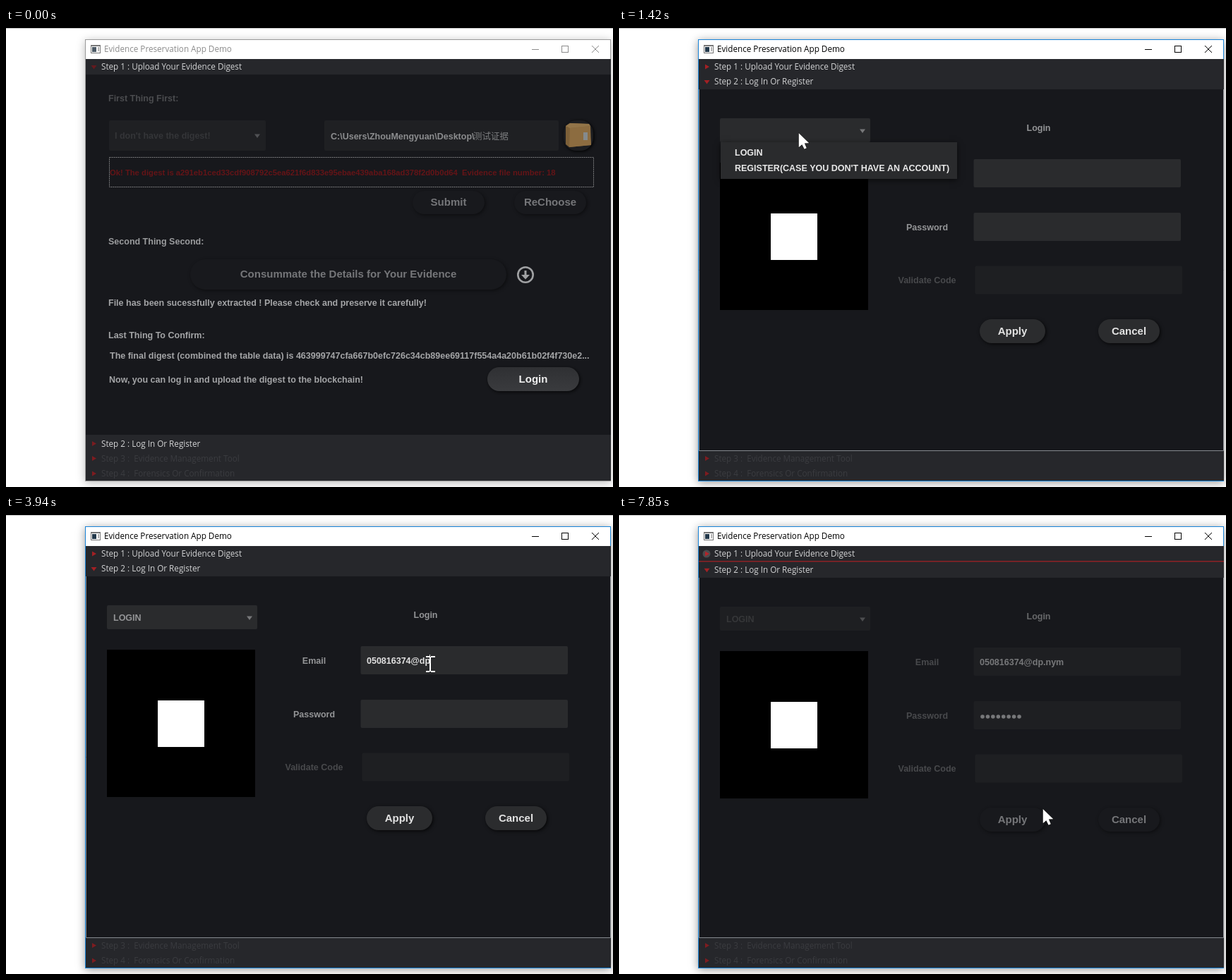
Write an HTML page with a canvas that moves like this. It is 860x651 px and loops after 8 s.

```html
<!DOCTYPE html>
<html lang="en">
<head>
<meta charset="utf-8">
<title>Evidence Preservation App Demo</title>
<style>
html, body { margin: 0; width: 100%; height: 100%; overflow: hidden; background: #fff; }
canvas { display: block; }
</style>
</head>
<body>
<canvas id="stage" width="860" height="651"></canvas>
<script>
const g = document.getElementById('stage').getContext('2d');
const LOOP = 8000;
const BG = '#17181c', BAR = '#26272b', FIELD = '#2a2b2d', LABEL = '#949597', BRIGHT = '#e2e2e2', RED = '#a32024';
const ARIAL = '"Liberation Sans", Arial, "Noto Sans CJK SC", "Noto Sans CJK", sans-serif';
const UI = '"Open Sans", "Noto Sans", sans-serif';
const EMAIL = '050816374@dp.nym';

// When each character appears
const emailKeys = [2520, 2520, 2633, 2746, 2859, 2972, 3085, 3198, 3310,
  3620, 3830, 3940, 4160, 4270, 4370, 4480];
const passKeys = [5040, 5150, 5380, 5480, 5800, 5800, 6000, 6110];

// Pointer stops: time, x, y, text cursor
const pointer = [
  [100, 746, 500], [950, 600, 395], [1065, 370, 228], [1180, 254, 148],
  [1640, 244, 156], [1750, 230, 164], [1860, 219, 169], [1960, 212, 171],
  [2300, 601, 211, 1], [4590, 630, 262, 1], [4700, 624, 283, 1],
  [6320, 604, 345], [6430, 545, 440], [6540, 527, 447], [6650, 552, 431],
  [7320, 558, 430], [7430, 568, 427], [7530, 578, 424], [7640, 588, 420],
  [7740, 596, 417], [7850, 600, 416]
];

const typed = (keys, t) => keys.filter(k => k <= t).length;

function rect(x, y, r, b, color) {
  g.fillStyle = color;
  g.fillRect(x, y, r - x, b - y);
}

function round(x, y, r, b, radius, color) {
  g.fillStyle = color;
  g.beginPath();
  g.roundRect(x, y, r - x, b - y, radius);
  g.fill();
}

function poly(points, color) {
  g.fillStyle = color;
  g.beginPath();
  points.forEach(([x, y]) => g.lineTo(x, y));
  g.closePath();
  g.fill();
}

function line(points, color, width = 1) {
  g.strokeStyle = color;
  g.lineWidth = width;
  g.beginPath();
  points.forEach(([x, y], i) => i ? g.lineTo(x, y) : g.moveTo(x, y));
  g.stroke();
}

function disc(x, y, r, color) {
  g.fillStyle = color;
  g.beginPath();
  g.arc(x, y, r, 0, 7);
  g.fill();
}

// y is the middle of the capitals; baselines sit on whole pixels
function text(s, x, y, color, size = 12.5, align = 'left', weight = 'bold') {
  g.font = `${weight} ${size}px ${ARIAL}`;
  g.textAlign = align;
  g.fillStyle = color;
  g.fillText(s, x, Math.floor(y + size * .36));
}

function uiText(s, x, y, color) {
  g.font = `11.7px ${UI}`;
  g.textAlign = 'left';
  g.fillStyle = color;
  g.fillText(s, x, Math.round(y + 4));
}

function shadow(blur, dx, dy, color, draw) {
  g.save();
  g.shadowBlur = blur;
  g.shadowOffsetX = dx;
  g.shadowOffsetY = dy;
  g.shadowColor = color;
  draw();
  g.restore();
}

function pill(s, x, y, r, b, fill, color, shade = '#000b') {
  shadow(5, 1.5, 1.5, shade, () => round(x, y, r, b, (b - y) / 2, fill));
  text(s, (x + r) / 2, (y + b) / 2, color, 15, 'center');
}

const dimPill = (s, x, y, r, b) => pill(s, x, y, r, b, '#18191d', '#757679', '#0007');

const dropArrow = (x, y, color) => poly([[x - 4, y - 2.5], [x + 4, y - 2.5], [x, y + 3]], color);

function marker(y, open, color = RED) {
  poly(open ? [[120.5, y - 2], [128.5, y - 2], [124.5, y + 3.5]]
            : [[122, y - 3.5], [128, y], [122, y + 3.5]], color);
}

function step(s, y, top, open, color = '#d2d3d4', mark = RED) {
  rect(113, top, 857, top + 22, BAR);
  marker(y, open, mark);
  uiText(s, 135, y, color);
}

function clipped(top, bottom, draw) {
  if (bottom <= top) return;
  g.save();
  g.beginPath();
  g.rect(113, top, 744, bottom - top);
  g.clip();
  draw();
  g.restore();
}

function windowFrame(active) {
  const ink = active ? '#000' : '#8c8c8c';
  rect(0, 0, 860, 651, '#fff');
  rect(0, 0, 860, 1, '#c4c4c4');
  shadow(12, 0, 2, active ? '#0006' : '#0004',
    () => rect(112, 16, 857, 643, active ? '#1883d7' : '#9a9a9a'));
  rect(113, 17, 856, 44, '#fff');
  rect(113, 44, 857, 642, BAR);
  rect(120, 24, 134, 36, '#777');
  rect(121, 26, 133, 35, '#fff');
  rect(122, 27, 128, 34, active ? '#243a4c' : '#4c5a66');
  rect(130, 27, 132, 33, '#b4b4b4');
  uiText('Evidence Preservation App Demo', 139, 30, ink);
  line([[745, 30.5], [755, 30.5]], ink);
  g.strokeStyle = ink;
  g.strokeRect(787.5, 25.5, 9, 9);
  line([[830, 25], [840, 35]], ink);
  line([[840, 25], [830, 35]], ink);
}

function uploadPane() {
  rect(113, 65, 857, 577, BG);
  text('First Thing First:', 145, 100, '#4b4c4f');
  round(146, 131, 368, 174, 2, '#1f2023');
  text("I don't have the digest!", 154, 153, '#343538');
  dropArrow(356, 153, '#505154');
  round(451, 131, 783, 174, 2, '#1f2023');
  text('C:\\Users\\ZhouMengyuan\\Desktop\\', 460, 153.5, '#8c8d8f');
  text('测试证据', 662, 153.5, '#7c7d7f', 12.5, 'left', 'normal');

  shadow(4, 1, 1, '#000', () => round(790, 131, 832, 174, 18, '#1c1d20'));
  poly([[793, 139], [799, 135], [826, 136], [829, 166], [798, 169], [793, 165]], '#7d6038');
  poly([[799, 142], [828, 139], [829, 166], [798, 169]], '#8c6c40');
  poly([[793, 139], [799, 135], [826, 136], [828, 139], [799, 142]], '#927448');
  rect(818, 148, 824, 159, '#858a8d');

  g.setLineDash([2, 1]);
  g.strokeStyle = '#7c7d7f';
  g.lineWidth = 1;
  g.strokeRect(146.5, 183.5, 686, 42);
  g.setLineDash([]);
  text('Ok! The digest is a291eb1ced33cdf908792c5ea621f6d833e95ebae439aba168ad378f2d0b0d64  Evidence file number: 18',
    147, 205, '#641417', 11.25);
  dimPill('Submit', 576, 231, 678, 264);
  dimPill('ReChoose', 720, 231, 822, 264);
  text('Second Thing Second:', 145, 303, '#9b9c9e');
  dimPill('Consummate the Details for Your Evidence', 261, 328, 709, 371);
  g.strokeStyle = '#a0a1a3';
  g.lineWidth = 2.6;
  g.beginPath();
  g.arc(736, 350, 10.7, 0, 7);
  g.stroke();
  rect(734.5, 344, 737.5, 351, '#a0a1a3');
  poly([[730, 350], [742, 350], [736, 356.5]], '#a0a1a3');
  text('File has been sucessfully extracted ! Please check and preserve it carefully!', 145, 390, '#a4a5a7');
  text('Last Thing To Confirm:', 145, 436, '#a4a5a7');
  text('The final digest (combined the table data) is 463999747cfa667b0efc726c34cb89ee69117f554a4a20b61b02f4f730e2...',
    147, 465, '#a4a5a7');
  text('Now, you can log in and upload the digest to the blockchain!', 146, 498.5, '#a4a5a7');
  const glow = g.createLinearGradient(0, 481, 0, 515);
  glow.addColorStop(0, '#2f3033');
  glow.addColorStop(1, '#3a3b3e');
  pill('Login', 682, 481, 812, 515, glow, '#f0f0f0');
}

// Drawn with its header ending at y = 87
function loginPane(t) {
  const off = t >= 6860;
  const field = off ? '#1e1f22' : FIELD;
  const label = off ? '#48494c' : LABEL;
  const value = off ? '#77787a' : BRIGHT;
  round(143, 128, 356, 162, 2, field);
  if (t >= 2180) text('LOGIN', 152, 145.5, off ? '#363739' : LABEL);
  dropArrow(345, 146, off ? '#4d4e50' : '#77787a');
  rect(143, 191, 353, 400, '#000');
  rect(215, 263, 281, 329, '#fff');

  text('Login', 594.5, 142, off ? '#68696b' : LABEL, 12.5, 'center');
  text('Email', 436.5, 207, label, 12.5, 'center');
  text('Password', 436.5, 283, label, 12.5, 'center');
  text('Validate Code', 436.5, 358, '#48494c', 12.5, 'center');
  round(502.5, 186, 796, 226, 2, field);
  round(502.5, 262, 796, 302, 2, field);
  round(504.5, 337.5, 798, 377.5, 2, '#1e1f22');

  const mail = EMAIL.slice(0, typed(emailKeys, t));
  text(mail, 511, 207, value);
  if (t >= 2520 && t < 4590) {
    const end = Math.round(511 + g.measureText(mail).width);
    rect(end - 1, 198, end, 215, BRIGHT);
  }
  const dots = typed(passKeys, t);
  for (let i = 0; i < dots; i++) disc(515 + 7.43 * i, 284, 2.8, off ? '#77787a' : '#d8d8d8');
  if (t >= 4930 && !off) {
    const end = Math.round(511 + 7.45 * dots);
    rect(end, 274, end + 1, 291, BRIGHT);
  }
  const button = off ? dimPill : (...box) => pill(...box, '#2b2c2e', BRIGHT);
  button('Apply', 511, 413, 604, 447);
  button('Cancel', 679, 413, 766, 447);
}

function accordion(t) {
  const opening = t < 640;
  const stepped = Math.floor((t - 100) / 108) / 4;
  const p = Math.min(1, Math.max(0, stepped));
  const ease = p * p * (3 - 2 * p);
  const head = 65 + 512 * (1 - ease);     // top of the second header
  const off = t >= 6860;
  const focused = !opening && t < 1320;
  const shift = focused || off ? 2 : 0;

  if (p < 1) clipped(65, head, uploadPane);
  clipped(head, 599, () => {
    rect(113, head, 857, 599, BG);
    g.translate(0, head - 65 + shift);
    if (p > 0) loginPane(t);
  });
  step('Step 3 :  Evidence Management Tool', 610.5, 599, false, '#3b3c40', '#7e1c20');
  step('Step 4 :  Forensics Or Confirmation', 632, 620, false, '#3b3c40', '#7e1c20');
  if (p > 0) {
    const top = head + 22 + shift;
    line([[113.5, top], [113.5, 599.5], [856.5, 599.5], [856.5, top]], '#85898e');
  }
  step('Step 1 : Upload Your Evidence Digest', 55, 44, p < 1, '#d2d3d4', p < 1 ? '#651a1e' : RED);
  const y2 = head + (off ? 12.7 : p > 0 ? 11 : 12.5);
  rect(113, head, 857, head + 22 + shift, BAR);
  if (focused) disc(124.5, y2 - .5, 5.5, '#6b2024');
  marker(y2, p > 0, focused ? '#c9272b' : p > 0 ? RED : '#7a1c20');
  uiText('Step 2 : Log In Or Register', 135, y2, '#d2d3d4');
  if (focused) rect(113, 86.5, 857, 88.3, RED);
  if (off) {
    disc(124, 55, 5.5, '#4a4b4e');
    marker(55, false, '#b3242a');
    rect(113, 65, 857, 66.5, '#8e2226');
  }
}

function menu(hover) {
  shadow(8, 0, 2, '#0009', () => rect(144, 162, 479, 214, FIELD));
  if (hover) rect(145, 165.5, 478, 188, '#0096c9');
  text('LOGIN', 164, 177, '#e8e8e8');
  text("REGISTER(CASE YOU DON'T HAVE AN ACCOUNT)", 164, 199, '#e8e8e8');
}

function cursor(t) {
  const stop = pointer.filter(s => s[0] <= t).pop();
  if (!stop) return;
  const [, x, y, beam] = stop;
  g.save();
  g.translate(x, y);
  if (beam) {
    rect(-1, -10, 1, 11, '#fff');
    for (const end of [-11, 10]) {
      rect(-6, end, -1, end + 2, '#fff');
      rect(1, end, 7, end + 2, '#fff');
    }
  } else {
    const shape = [[.7, 1], [.7, 21.3], [5.3, 17.2], [8.6, 23.7], [11.8, 22.3], [8.9, 15.6], [15.3, 15.3]];
    line([...shape, shape[0]], '#000', 1);
    poly(shape, '#fff');
  }
  g.restore();
}

const start = performance.now();
function frame() {
  const t = (performance.now() - start) % LOOP;
  windowFrame(t >= 100);
  accordion(t);
  if (t >= 1420 && t < 2180) menu(t >= 1750);
  cursor(t);
  requestAnimationFrame(frame);
}
frame();
</script>
</body>
</html>
```
